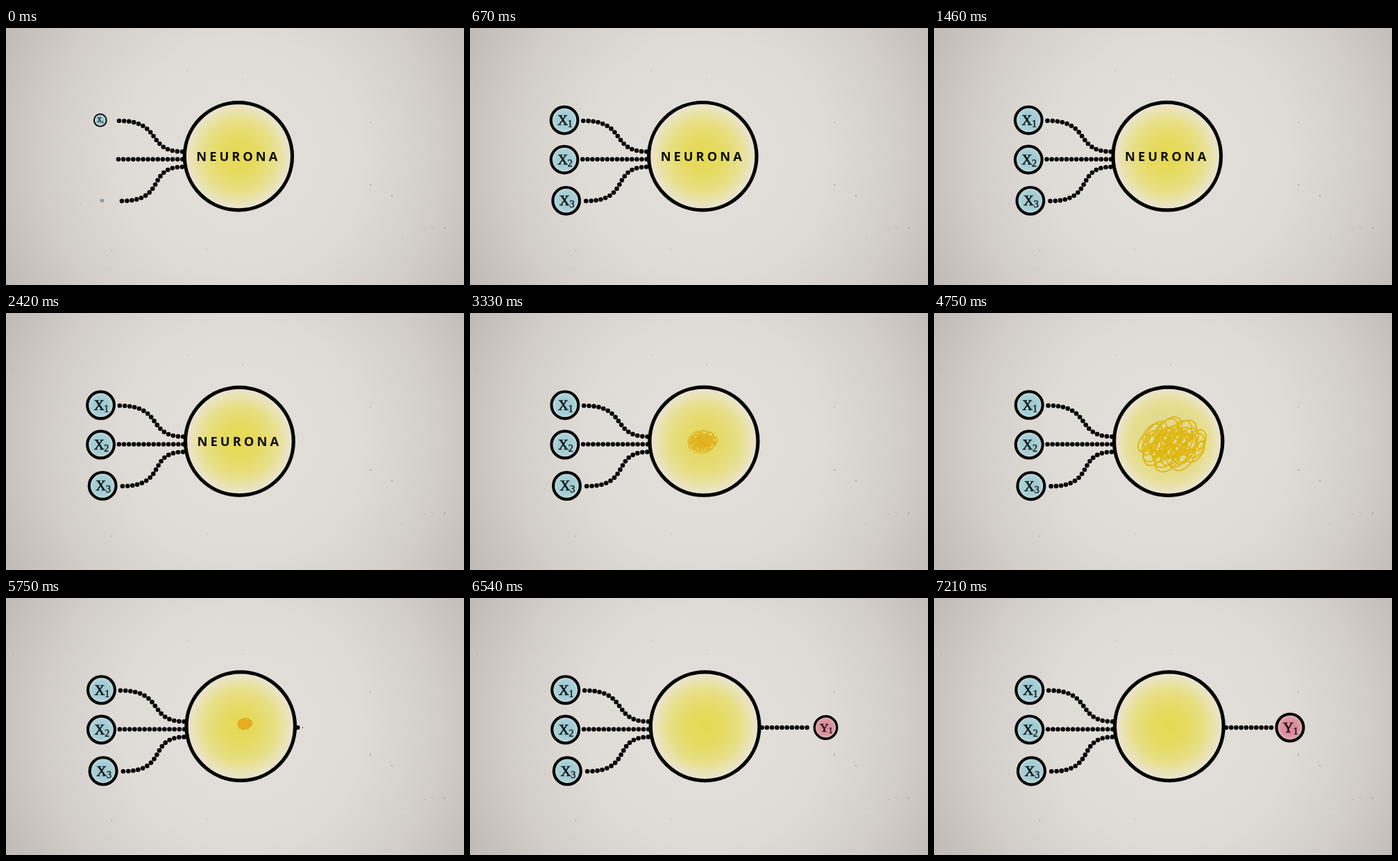
An HTML page for the animation above (7250 ms loop, 660x371 px).

```html
<!DOCTYPE html>
<html lang="es">
<head>
<meta charset="utf-8">
<title>Neurona</title>
<style>
  html, body { margin: 0; width: 100%; height: 100%; overflow: hidden; background: #dedbd6; }
  svg { display: block; width: 100vw; height: 100vh; }
  .beads { fill: none; stroke: #070706; stroke-width: 6.6; stroke-linecap: round; stroke-dasharray: 0 7.1; }
  .ring { stroke: #050504; }
  .label { font: 700 18.3px "Open Sans", "Noto Sans", sans-serif; letter-spacing: 4px; fill: #0d0c08; }
  .var { font: 20.5px "Liberation Serif", "Noto Serif", serif; fill: #101415; stroke: #101415; stroke-width: .65; }
  .sub { font-size: 14px; stroke-width: .4; }
  #scribble { fill: none; stroke-linejoin: round; vector-effect: non-scaling-stroke; }
</style>
</head>
<body>
<svg viewBox="0 0 660 371" preserveAspectRatio="none">
  <defs>
    <radialGradient id="paper" gradientUnits="userSpaceOnUse" cx="340" cy="185" r="385">
      <stop offset="0" stop-color="#e3dfda"/>
      <stop offset=".45" stop-color="#dfdbd6"/>
      <stop offset=".75" stop-color="#d2cdc9"/>
      <stop offset="1" stop-color="#c1bbb8"/>
    </radialGradient>
    <radialGradient id="yellow">
      <stop offset="0" stop-color="#e5d952"/>
      <stop offset=".35" stop-color="#e6db62"/>
      <stop offset=".65" stop-color="#e8df86"/>
      <stop offset=".86" stop-color="#eae3b4"/>
      <stop offset="1" stop-color="#e8e4da"/>
    </radialGradient>
    <radialGradient id="pale">
      <stop offset="0" stop-color="#e0d9a4"/>
      <stop offset=".5" stop-color="#e0d9a0" stop-opacity=".9"/>
      <stop offset="1" stop-color="#e2da90" stop-opacity="0"/>
    </radialGradient>
    <radialGradient id="blue">
      <stop offset="0" stop-color="#9cc9d1"/>
      <stop offset=".65" stop-color="#a5ced5"/>
      <stop offset="1" stop-color="#c6dadc"/>
    </radialGradient>
    <radialGradient id="pink">
      <stop offset="0" stop-color="#db8394"/>
      <stop offset=".65" stop-color="#dc929f"/>
      <stop offset="1" stop-color="#e0bcc0"/>
    </radialGradient>
  </defs>
  <rect width="660" height="371" fill="url(#paper)"/>
  <g id="specks" fill="#77736f"></g>
  <g id="scene">
    <path class="beads" d="M163 134C227 134 201 178.5 254.5 178.5"/>
    <path class="beads" d="M162 189.5H255"/>
    <path class="beads" d="M167 249.7C233 249.7 201 200.5 255.5 200.5"/>
    <g id="output" fill="#070706"></g>
    <circle class="ring" cx="334.9" cy="185.2" r="77.6" fill="url(#yellow)" stroke-width="5.2"/>
    <circle id="haze" cx="334.9" cy="185.2" r="72" fill="url(#pale)"/>
    <path id="scribble"/>
    <text id="name" class="label" x="274.3" y="192">NEURONA</text>
    <g id="nodes"></g>
  </g>
</svg>
<script>
const LOOP = 7250;
const $ = id => document.getElementById(id);
const clamp = v => Math.min(1, Math.max(0, v));
const span = (t, from, to) => clamp((t - from) / (to - from));
const smooth = p => p * p * (3 - 2 * p);
const easeOut = p => 1 - (1 - p) ** 2.4;
const mix = (a, b, p) => a + (b - a) * p;

function add(parent, tag, attrs, text = '') {
  const el = document.createElementNS('http://www.w3.org/2000/svg', tag);
  for (const key in attrs) el.setAttribute(key, attrs[key]);
  el.textContent = text;
  parent.append(el);
  return el;
}

// Paper dust: x, y, radius, opacity
[[525, 136, .9, .4], [525, 226.5, 1, .6], [556, 242, 1.3, .35], [632, 289, 1.1, .6],
 [603, 291, .8, .4], [614, 288, .8, .4], [152, 322, .9, .4], [341, 75, .9, .3],
 [261, 61, .9, .3], [10, 82, .8, .4], [95, 74, .8, .25], [108, 254, .8, .3],
 [290, 319, .8, .3], [571, 304, .8, .3], [150, 347, .8, .3]
].forEach(([cx, cy, r, opacity]) => add($('specks'), 'circle', { cx, cy, r, opacity }));

const nodes = [
  { x: 135.8, y: 133.2, letter: 'X', sub: 1, fill: 'blue', start: -90 },
  { x: 138.4, y: 249.2, letter: 'X', sub: 3, fill: 'blue', start: -18 },
  { x: 135.8, y: 190, letter: 'X', sub: 2, fill: 'blue', start: 60 },
  { x: 507.3, y: 187, letter: 'Y', sub: 1, fill: 'pink', start: 6330 }
].map(n => {
  const g = add($('nodes'), 'g', {});
  add(g, 'circle', { class: 'ring', r: 19.3, fill: `url(#${n.fill})`, 'stroke-width': 4.1 });
  add(g, 'text', { class: 'var', x: -9.8, y: 6.8 }, n.letter);
  add(g, 'text', { class: 'var sub', x: 4.8, y: 9.8 }, n.sub);
  return { ...n, g };
});

const beads = Array.from({ length: 10 }, (_, i) =>
  add($('output'), 'circle', { cx: 416.2 + i * 7.15, cy: 187 }));

// A tangle of small leaning loops riding on a slower wandering orbit
function tangle(shift) {
  let d = '';
  const steps = 1000;
  for (let i = 0; i <= steps; i++) {
    const u = i / steps * Math.PI * 2;
    const orbit = u * 5;
    const reach = .66 + .34 * Math.sin(u * 3 + shift);
    const loop = u * 53 + shift * 2;
    const size = 1 + .25 * Math.sin(u * 7 - shift);
    const long = 13 * size * Math.cos(loop);
    const short = 7.5 * size * Math.sin(loop);
    const tip = 5 * Math.max(0, Math.cos(orbit)) ** 10;
    const x = 41 * reach * Math.cos(orbit) + tip + .55 * long + .83 * short - 1;
    const y = 26 * reach * Math.sin(orbit) - .83 * long + .55 * short;
    d += (i ? 'L' : 'M') + x.toFixed(1) + ' ' + y.toFixed(1);
  }
  return d;
}

function drawScribble(t) {
  const grow = smooth(span(t, 2900, 3850));
  const shrink = smooth(span(t, 5150, 6000));
  const scale = grow * (1 - shrink);
  const el = $('scribble');
  $('haze').style.opacity = .75 * scale * scale;
  el.style.display = scale > .015 ? '' : 'none';
  if (scale <= .015) return;
  const x = mix(mix(327, 340.5, grow), 341, shrink);
  const y = mix(mix(183, 189.5, grow), 179.5, shrink);
  el.setAttribute('d', tangle((t - 2900) / 900));
  el.setAttribute('transform', `translate(${x} ${y}) scale(${scale})`);
  const weight = t < 4500 ? mix(.4, 1.9, grow) : 1.9 * Math.min(1, scale * 4);
  el.setAttribute('stroke-width', weight);
  el.setAttribute('stroke', `rgb(${mix(230, 223, scale)},${mix(170, 184, scale)},${mix(34, 18, scale)})`);
}

function draw(t) {
  // Slow camera push
  const drift = 1 - (1 - t / LOOP) ** 1.15;
  const zoom = 1 + .01 * drift;
  $('scene').setAttribute('transform',
    `matrix(${zoom} 0 0 ${zoom} ${.64 * drift} ${185.5 * (1 - zoom)})`);

  for (const n of nodes) {
    const size = easeOut(span(t, n.start, n.start + 400));
    n.g.style.display = size > 0 ? '' : 'none';
    n.g.setAttribute('transform', `translate(${n.x} ${n.y}) scale(${size})`);
  }
  beads.forEach((bead, i) =>
    bead.setAttribute('r', 3.3 * span(t, 5660 + i * 76, 5730 + i * 76)));

  $('name').style.opacity = 1 - span(t, 2450, 2850);
  drawScribble(t);
}

const begin = performance.now();
function frame() {
  draw((performance.now() - begin) % LOOP);
  requestAnimationFrame(frame);
}
frame();
</script>
</body>
</html>
```
